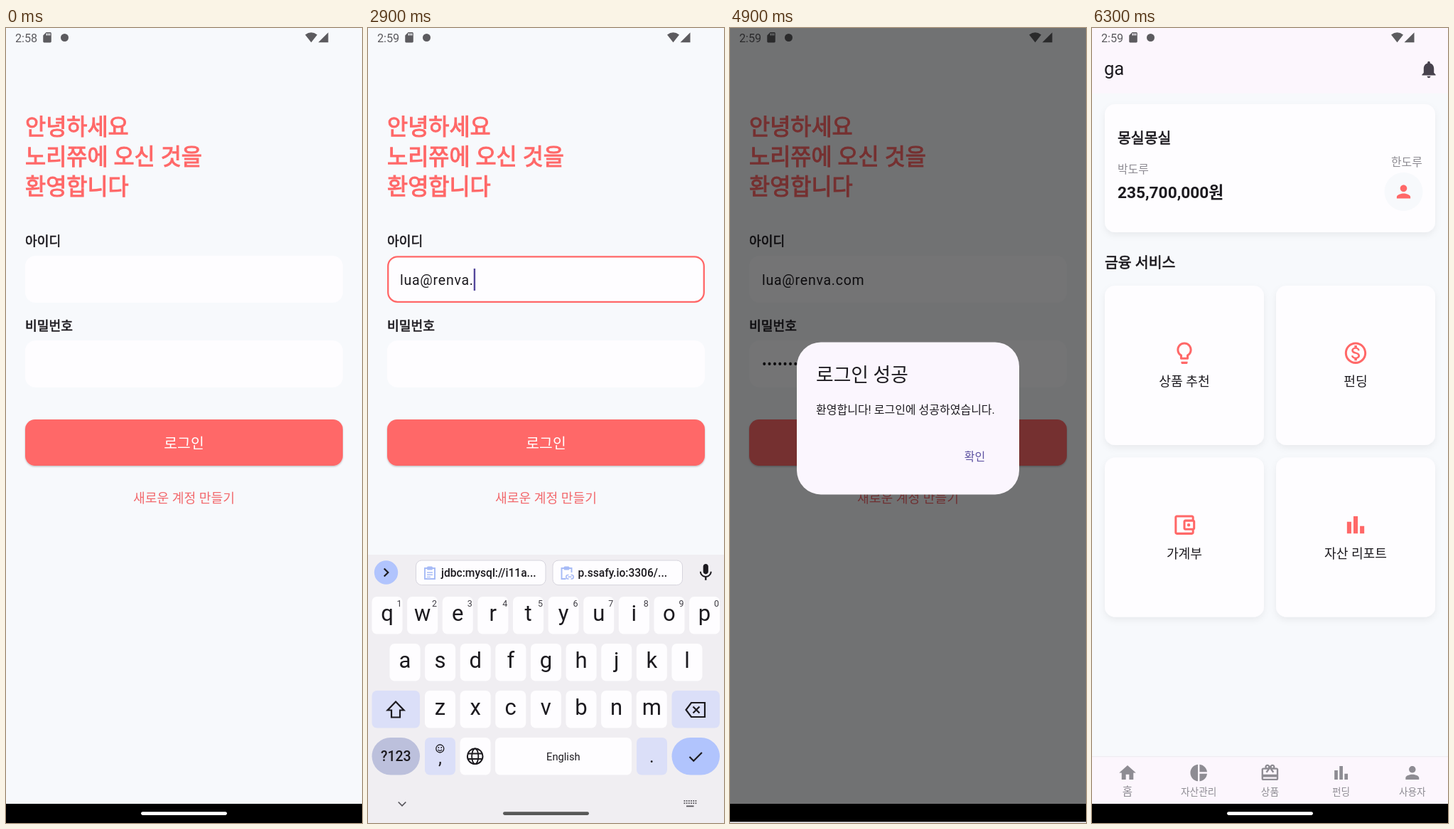
Recreate the animation shown at these times as an HTML page. Size 501 by 1117 pixels, loop 6.4 s.

```html
<!DOCTYPE html>
<html lang="ko">
<head>
<meta charset="utf-8">
<title>Login</title>
<style>
html, body { margin: 0; width: 100%; height: 100%; overflow: hidden; background: #f7f9fc; }
svg { display: block; width: 100vw; height: 100vh; }
text { font-family: Roboto, "Noto Sans CJK KR", "Noto Sans KR", "Noto Sans CJK", sans-serif; }
</style>
</head>
<body>
<svg id="stage" viewBox="0 0 501 1117" xmlns="http://www.w3.org/2000/svg"></svg>
<script>
const LOOP = 6400;
const CORAL = '#ff6868', INK = '#1c1a1f', GREY = '#8e8c93', WHITE = '#fefdff';
const LILAC = '#dbdff8', BLUE = '#b1c4fd', KB_HEIGHT = 377;
const EMAIL = 'lua@renva.com';

// Drawing helpers
const text = (x, y, size, str, fill = INK, extra = '') =>
  `<text x="${x}" y="${y}" font-size="${size}" fill="${fill}" ${extra}>${str}</text>`;
const mid = (x, y, size, str, fill, extra = '') =>
  text(x, y, size, str, fill, `text-anchor="middle" ${extra}`);
const bold = (x, y, size, str, fill = INK) =>
  text(x, y, size, str, fill, `stroke="${fill}" stroke-width="${size / 30}"`);
const rect = (x, y, w, h, r, fill, extra = '') =>
  `<rect x="${x}" y="${y}" width="${w}" height="${h}" rx="${r}" fill="${fill}" ${extra}/>`;
const circle = (x, y, r, fill, extra = '') =>
  `<circle cx="${x}" cy="${y}" r="${r}" fill="${fill}" ${extra}/>`;
const line = (d, color = INK, width = 2.2) =>
  `<path d="${d}" fill="none" stroke="${color}" stroke-width="${width}"/>`;
const icon = (d, x, y, scale, fill) =>
  `<path transform="translate(${x} ${y}) scale(${scale}) translate(-12 -12)" d="${d}" fill="${fill}"/>`;
const group = (id, body, extra = '') => `<g id="${id}" ${extra}>${body}</g>`;

const ICONS = {
  bell: 'M12 22c1.1 0 2-.9 2-2h-4c0 1.1.89 2 2 2zm6-6v-5c0-3.07-1.64-5.64-4.5-6.32V4c0-.83-.67-1.5-1.5-1.5s-1.5.67-1.5 1.5v.68C7.63 5.36 6 7.92 6 11v5l-2 2v1h16v-1l-2-2z',
  person: 'M12 12c2.21 0 4-1.79 4-4s-1.79-4-4-4-4 1.79-4 4 1.79 4 4 4zm0 2c-2.67 0-8 1.34-8 4v2h16v-2c0-2.66-5.33-4-8-4z',
  bulb: 'M9 21c0 .55.45 1 1 1h4c.55 0 1-.45 1-1v-1H9v1zm3-19C8.14 2 5 5.14 5 9c0 2.38 1.19 4.47 3 5.74V17c0 .55.45 1 1 1h6c.55 0 1-.45 1-1v-2.26c1.81-1.27 3-3.36 3-5.74 0-3.86-3.14-7-7-7zm2.85 11.1l-.85.6V16h-4v-2.3l-.85-.6C7.8 12.16 7 10.63 7 9c0-2.76 2.24-5 5-5s5 2.24 5 5c0 1.63-.8 3.16-2.15 4.1z',
  coin: 'M12 2C6.48 2 2 6.48 2 12s4.48 10 10 10 10-4.48 10-10S17.52 2 12 2zm0 18c-4.41 0-8-3.59-8-8s3.59-8 8-8 8 3.59 8 8-3.59 8-8 8zm.31-8.86c-1.77-.45-2.34-.94-2.34-1.67 0-.84.79-1.43 2.1-1.43 1.38 0 1.9.66 1.94 1.64h1.71c-.05-1.34-.87-2.57-2.49-2.97V5H10.9v1.69c-1.51.32-2.72 1.3-2.72 2.81 0 1.79 1.49 2.69 3.66 3.21 1.95.46 2.34 1.15 2.34 1.87 0 .53-.39 1.39-2.1 1.39-1.6 0-2.23-.72-2.32-1.64H8.04c.1 1.7 1.36 2.66 2.86 2.97V19h2.34v-1.67c1.52-.29 2.72-1.16 2.73-2.77-.01-2.2-1.9-2.96-3.66-3.42z',
  wallet: 'M21 7.28V5c0-1.1-.9-2-2-2H5c-1.11 0-2 .9-2 2v14c0 1.1.89 2 2 2h14c1.1 0 2-.9 2-2v-2.28c.59-.35 1-.98 1-1.72V9c0-.74-.41-1.37-1-1.72zM20 9v6h-7V9h7zM5 19V5h14v2h-6c-1.1 0-2 .9-2 2v6c0 1.1.9 2 2 2h6v2H5zM14.5 12a1.5 1.5 0 1 0 3 0a1.5 1.5 0 1 0-3 0z',
  bars: 'M4 9h4v11H4zm12 4h4v7h-4zm-6-9h4v16h-4z',
  home: 'M10 20v-6h4v6h5v-8h3L12 3 2 12h3v8z',
  pie: 'M11 2v20c-5.07-.5-9-4.79-9-10s3.93-9.5 9-10zm2.03 0v8.99H22c-.47-4.74-4.24-8.52-8.97-8.99zm0 11.01V22c4.74-.47 8.5-4.25 8.97-8.99h-8.97z',
  gift: 'M20 6h-2.18c.11-.31.18-.65.18-1 0-1.66-1.34-3-3-3-1.05 0-1.96.54-2.5 1.35l-.5.67-.5-.68C10.96 2.54 10.05 2 9 2 7.34 2 6 3.34 6 5c0 .35.07.69.18 1H4c-1.11 0-1.99.89-1.99 2L2 19c0 1.11.89 2 2 2h16c1.11 0 2-.89 2-2V8c0-1.11-.89-2-2-2zm-5-2c.55 0 1 .45 1 1s-.45 1-1 1-1-.45-1-1 .45-1 1-1zM9 4c.55 0 1 .45 1 1s-.45 1-1 1-1-.45-1-1 .45-1 1-1zm11 15H4v-2h16v2zm0-5H4V8h5.08L7 10.83 8.62 12 11 8.76l1-1.36 1 1.36L15.38 12 17 10.83 14.92 8H20v6z',
  card: 'M18 2h-8L4.02 8 4 20c0 1.1.9 2 2 2h12c1.1 0 2-.9 2-2V4c0-1.1-.9-2-2-2zm-6 6h-2V4h2v4zm3 0h-2V4h2v4zm3 0h-2V4h2v4z',
  mic: 'M12 14c1.66 0 2.99-1.34 2.99-3L15 5c0-1.66-1.34-3-3-3S9 3.34 9 5v6c0 1.66 1.34 3 3 3zm5.3-3c0 3-2.54 5.1-5.3 5.1S6.7 14 6.7 11H5c0 3.41 2.72 6.23 6 6.72V21h2v-3.28c3.28-.48 6-3.3 6-6.72h-1.7z'
};

function statusBar() {
  const c = '#5c5b5f';
  return text(13, 19.5, 16.2, '2:58', c, 'id="clock"') +
    icon(ICONS.card, 58, 13.3, .72, c) + circle(82.5, 13.5, 5.5, c) +
    `<path d="M429.5 20.3L421 9.6Q429.5 2.8 438 9.6ZM439.5 20.3H453.5V6.3Z" fill="${c}"/>`;
}

function loginPage() {
  const field = (id, y) => rect(27, y, 447, 66, 14.5, WHITE) +
    rect(28.2, y + 1.4, 444.6, 63.4, 13.3, 'none', `id="${id}" stroke="${CORAL}" stroke-width="2.3"`);
  return rect(0, 0, 501, 1117, 0, '#f7f9fc') +
    ['안녕하세요', '노리쮸에 오신 것을', '환영합니다']
      .map((s, i) => bold(27, 149.8 + 42.2 * i, 31.7, s, CORAL)).join('') +
    bold(27, 306, 18.2, '아이디') + bold(27, 425, 18.2, '비밀번호') +
    field('focusId', 320) + field('focusPw', 439) +
    text(45, 361, 19.5, '', INK, 'id="idText" letter-spacing=".75"') +
    text(45, 478.7, 19.5, '', INK, 'id="pwText" letter-spacing=".75"') +
    rect(0, 0, 2.4, 31, 0, '#54479b', 'id="caret"') +
    group('ready', rect(27, 550, 447, 65, 14, CORAL, 'filter="url(#low)"') +
      mid(250.5, 591, 20.4, '로그인', '#fff')) +
    group('busy', rect(27, 550, 447, 76.3, 14, '#dedee0') +
      '<path id="spin" fill="none" stroke="#fff" stroke-width="4.6"/>') +
    mid(250.5, 667, 18.2, '새로운 계정 만들기', '#f2686c', 'id="signUp"');
}

function homePage() {
  const card = (x, y, w, h) => rect(x, y, w, h, 14.5, WHITE, 'filter="url(#soft)"');
  const tile = (x, y, pic, label) => card(x, y, 224, 224) +
    icon(ICONS[pic], x + 112, y + 94.7, 1.52, CORAL) + mid(x + 112, y + 141.2, 18.2, label);
  const tab = (i, pic, label) => icon(ICONS[pic], 50 + 100.2 * i, 1046.5, 1.18, GREY) +
    mid(50 + 100.2 * i, 1078, i ? 13.7 : 15.5, label, GREY);
  return rect(0, 0, 501, 1117, 0, '#f7f9fc') + rect(0, 0, 501, 92, 0, '#fcf6fd') +
    text(17, 66, 25.6, 'ga') + icon(ICONS.bell, 474, 58.2, 1.2, '#47424d') +
    card(18, 107, 465, 180) + bold(36, 161.5, 20.5, '몽실몽실') +
    text(36, 204, 15.9, '박도루', GREY) + text(421, 194, 15.9, '한도루', GREY) +
    text(36, 238.6, 22.7, '235,700,000원', INK, 'font-weight="700"') +
    circle(438.5, 230, 27, '#f7f9fc') + icon(ICONS.person, 438.5, 230, 1.2, CORAL) +
    bold(18, 337.4, 20.5, '금융 서비스') +
    tile(18, 362, 'bulb', '상품 추천') + tile(259, 362, 'coin', '펀딩') +
    tile(18, 603.5, 'wallet', '가계부') + tile(259, 603.5, 'bars', '자산 리포트') +
    rect(0, 1023, 501, 1.5, 0, '#efedf2') + rect(0, 1024.5, 501, 66, 0, '#fcf6fd') +
    tab(0, 'home', '홈') + tab(1, 'pie', '자산관리') + tab(2, 'gift', '상품') +
    tab(3, 'bars', '펀딩') + tab(4, 'person', '사용자');
}

function dialogBox() {
  return rect(94, 451.5, 313, 214, 34, '#fbf6fe') +
    text(121, 507.5, 26.8, '로그인 성공') +
    text(121, 552.5, 16, '환영합니다! 로그인에 성공하였습니다.') +
    rect(309, 590, 71, 44, 22, '#f3eef7', 'id="pressed"') +
    mid(344.5, 618.5, 16, '확인', '#5c50a0');
}

function chip(x, w, str, linked) {
  const cx = x + 19.5, c = '#a6baf6';
  return rect(x, 748, w, 34.6, 8, WHITE, 'stroke="#d6d4dd"') +
    line(`M${cx - 3} 759H${cx - 7}V774H${cx + (linked ? -1 : 7)}M${cx + 3} 759H${cx + 7}V${linked ? 765 : 775}`, c, 1.9) +
    rect(cx - 4, 756.5, 8, 5, 1.5, c) +
    (linked
      ? line(`M${cx + 3} 768.5h-1a2.7 2.7 0 0 0 0 5.4h1M${cx + 6} 768.5h1a2.7 2.7 0 0 1 0 5.4h-1M${cx + 2} 771.2h5`, c, 1.6)
      : line(`M${cx - 4} 765h8M${cx - 4} 768.2h8M${cx - 4} 771.4h5`, c, 1.4)) +
    text(x + 35.5, 770.7, 15.6, str, INK, 'font-weight="500"');
}

function keyboard() {
  const key = (x, y, fill = WHITE, w = 43, r = 7) => rect(x, y, w, 52.5, r, fill);
  const row = (letters, x, y) => [...letters].map((c, i) =>
    key(x + 49.62 * i, y) + mid(x + 21.5 + 49.62 * i, y + 33.7, 31, c)).join('');
  const hints = [...'1234567890'].map((c, i) => mid(44 + 49.62 * i, 812.7, 12.5, c, '#3f3d44')).join('');
  let dots = '';
  for (let r = 0; r < 2; r++)
    for (let i = 0; i < 6; i++) dots += rect(444.5 + 3.2 * i, 1085 + 3.3 * r, 1.8, 1.8, 0, '#56545a');
  return rect(0, 740, 501, KB_HEIGHT, 0, '#f0eef2') +
    group('barPlain', circle(25.5, 765, 16.7, BLUE) + line('M22.7 759.5l5.6 5.5l-5.6 5.5') +
      chip(67.5, 182.5, 'jdbc:mysql://i11a...') + chip(260, 182.5, 'p.ssafy.io:3306/...', true) +
      icon(ICONS.mic, 475.3, 765, 1.2, INK)) +
    group('barWide', chip(34.5, 215.5, 'jdbc:mysql://i11a503....') +
      chip(260, 215.5, 'p.ssafy.io:3306/picpl...', true)) +
    group('barSecret', chip(147.5, 215, '') +
      Array.from({ length: 24 }, (_, i) => circle(186 + 6.75 * i, 765.3, 2, INK)).join('')) +
    row('qwertyuiop', 5.5, 799) + row('asdfghjkl', 30.5, 865) + row('zxcvbnm', 80, 931) +
    key(5.5, 931, LILAC, 67.5) + line('M39 946.5L50.5 958.5H45V968.5H33V958.5H27.5Z') +
    key(427.5, 931, LILAC, 67.5) + line('M455 948H474V968H455L447.5 958ZM457.5 953.5l9 9m0-9l-9 9') +
    key(5.5, 997, '#bcc0dc', 67.5, 26.2) + mid(39.3, 1030, 19.4, '?123', INK, 'font-weight="500"') +
    key(80, 997, LILAC) + mid(101.5, 1031.5, 25, ',', INK, 'id="comma"') +
    group('hints', hints + circle(101.3, 1012.5, 5.5, 'none', `stroke="${INK}" stroke-width="1.3"`) +
      circle(99.3, 1011, .9, INK) + circle(103.3, 1011, .9, INK) + line('M98.5 1014q2.8 3 5.6 0', INK, 1.2)) +
    key(129.5, 997) + circle(150.7, 1023.3, 10.8, 'none', `stroke="${INK}" stroke-width="2"`) +
    `<ellipse cx="150.7" cy="1023.3" rx="4.6" ry="10.8" fill="none" stroke="${INK}" stroke-width="1.8"/>` +
    line('M141 1019.5H160.5M141 1027H160.5', INK, 1.8) +
    key(179, 997, WHITE, 192) + mid(274.8, 1028.6, 14.7, 'English') +
    key(378, 997, LILAC) + mid(399.3, 1031.5, 25, '.') +
    key(427.5, 997, BLUE, 67.5, 26.2) + line('M452.5 1024l5.7 5.7l11.7 -11.7') +
    line('M42.7 1087.5l5.3 5.3l5.3 -5.3', '#56545a', 1.7) + dots + rect(448, 1092.5, 10.5, 1.8, 0, '#56545a');
}

const stage = document.getElementById('stage');
stage.innerHTML = `<defs>
  <filter id="soft" x="-10%" y="-10%" width="120%" height="125%"><feDropShadow dx="0" dy="4" stdDeviation="5" flood-opacity=".06"/></filter>
  <filter id="low" x="-5%" y="-10%" width="110%" height="130%"><feDropShadow dx="0" dy="1.2" stdDeviation="1" flood-opacity=".25"/></filter>
</defs>` +
  group('login', loginPage()) + group('main', homePage()) + statusBar() +
  rect(0, 1090, 501, 27, 0, '#000') +
  rect(0, 0, 501, 1117, 0, '#000', 'id="dim"') + group('dialog', dialogBox()) +
  group('kb', keyboard()) + rect(190, 1101.3, 121, 4.6, 2.3, '#fff', 'id="handle"');

const el = {};
stage.querySelectorAll('[id]').forEach(n => el[n.id] = n);
const show = (id, on) => el[id].setAttribute('visibility', on ? 'inherit' : 'hidden');
const set = (id, name, value) => el[id].setAttribute(name, value);

// Timing helpers
const clamp = v => Math.max(0, Math.min(1, v));
const span = (t, a, b) => clamp((t - a) / (b - a));
const easeOut = (p, n = 2.7) => 1 - Math.pow(1 - p, n);
const typed = (t, start, step, max) => Math.max(0, Math.min(max, Math.floor((t - start) / step) + 1));

// cubic-bezier(.4, 0, .2, 1)
function standardEase(x) {
  let lo = 0, hi = 1, s = 0;
  for (let i = 0; i < 20; i++) {
    s = (lo + hi) / 2;
    const bx = 1.2 * s * (1 - s) ** 2 + .6 * s * s * (1 - s) + s ** 3;
    if (bx < x) lo = s; else hi = s;
  }
  return 3 * s * s * (1 - s) + s ** 3;
}

function spinnerPath(ms) {
  const p = ms / 1333 % 1, turn = ms / 2222 % 1;
  const head = standardEase(clamp(p * 2)), tail = standardEase(clamp(p * 2 - 1));
  const from = Math.PI * (-.5 + 1.5 * tail + 2 * turn + .5 * p);
  const sweep = Math.max(.01, 1.5 * Math.PI * (head - tail));
  const at = a => `${250.5 + 20.5 * Math.cos(a)} ${588.3 + 20.5 * Math.sin(a)}`;
  return `M${at(from)}A20.5 20.5 0 ${sweep > Math.PI ? 1 : 0} 1 ${at(from + sweep)}`;
}

function keyboardDrop(t) {
  if (t < 4780) return KB_HEIGHT * (1 - easeOut(span(t, 800, 1080)));
  if (t < 5340) return KB_HEIGHT * easeOut(span(t, 4780, 4915), 2.4);
  if (t < 5460) return KB_HEIGHT - 217 * easeOut(span(t, 5340, 5400), 1.5);
  return 160 + 217 * easeOut(span(t, 5460, 5680), 2);
}

function draw(t) {
  const home = t >= 5450, onId = t >= 700 && t < 3300, onPw = t >= 3300 && t < 4790;
  const busy = t >= 4300 && t < 4760, alert = t >= 4760 && !home;
  el.clock.textContent = t < 300 ? '2:58' : '2:59';
  show('login', !home);
  show('main', home);

  // Form
  const idCount = typed(t, 1500, 150, EMAIL.length), pwCount = typed(t, 3500, 85, 8);
  el.idText.textContent = EMAIL.slice(0, idCount);
  el.pwText.textContent = '•'.repeat(pwCount);
  show('focusId', onId);
  show('focusPw', onPw);
  const active = onPw ? el.pwText : el.idText;
  const width = active.textContent ? active.getComputedTextLength() : 0;
  set('caret', 'x', 45 + width);
  set('caret', 'y', onPw ? 456.5 : 338);
  show('caret', !home && (onId && !(t >= 1200 && t < 1500) || onPw && t < 4250));
  show('ready', !home && !busy);
  show('busy', !home && busy);
  set('signUp', 'y', busy ? 678.3 : 667);
  if (busy) set('spin', 'd', spinnerPath(t - 4300));

  // Dialog
  const fade = span(t, 4760, 4870);
  show('dim', alert);
  show('dialog', alert);
  set('dim', 'opacity', .54 * fade);
  set('dialog', 'opacity', fade);
  set('dialog', 'transform', `translate(0 ${-175 * (1 - easeOut(span(t, 4790, 4960)))})`);
  show('pressed', alert && t >= 5300);

  // Keyboard and gesture handle
  const drop = keyboardDrop(t), open = drop < KB_HEIGHT - .5;
  show('kb', open);
  set('kb', 'transform', `translate(0 ${drop})`);
  show('barPlain', open && t < 3300);
  show('hints', open && t < 3300);
  show('barWide', open && t >= 3300 && t < 5000);
  show('barSecret', open && t >= 5000);
  set('comma', 'y', t < 3300 ? 1033.5 : 1031.5);
  const shade = t < 4780 ? Math.round(255 - 167 * span(t, 1150, 1600)) : 255;
  set('handle', 'fill', `rgb(${shade},${shade},${shade})`);
  show('handle', t < 4780 || t >= 5340);
}

const begin = performance.now();
function tick() {
  draw((performance.now() - begin) % LOOP);
  requestAnimationFrame(tick);
}
tick();
</script>
</body>
</html>
```
